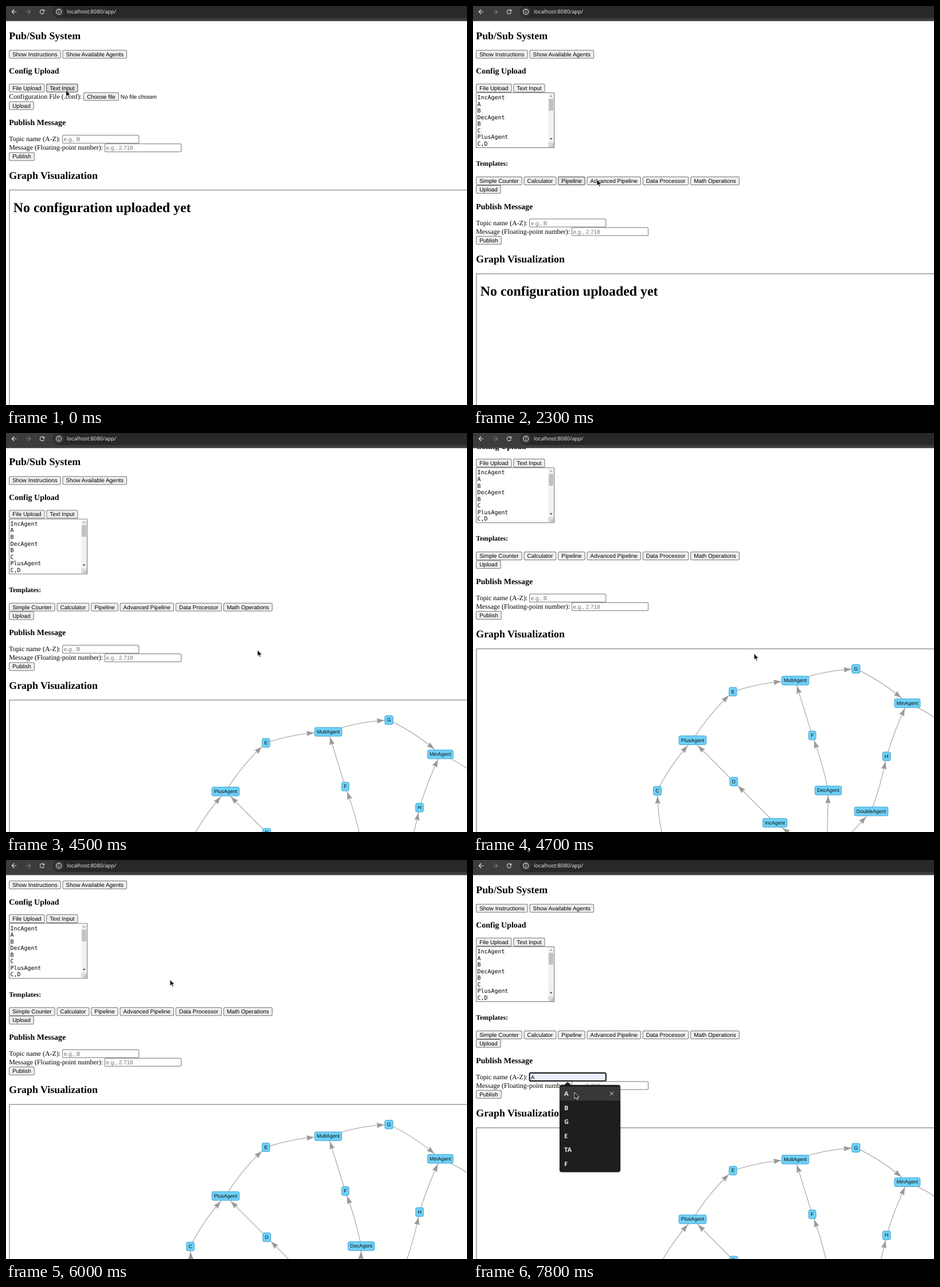
An HTML page with a canvas that plays this animation: 804x697 px, repeating every 8000 ms.

```html
<!DOCTYPE html>
<html lang="en">
<head>
<meta charset="utf-8">
<title>Pub/Sub System</title>
<style>
  html, body { margin: 0; height: 100%; overflow: hidden; background: #fffffd; }
  canvas { display: block; }
</style>
</head>
<body>
<canvas id="stage" width="804" height="697"></canvas>
<script>
const ctx = document.getElementById('stage').getContext('2d');
ctx.textRendering = 'geometricPrecision';

const LOOP = 8000, LEFT = 5.2, TOP = 26.4, PAPER = '#fffffd';
const ZOOM = .7467, GAP = 4 * ZOOM, ROW = 20.02 * ZOOM;
const serif = (px, weight = 400) => `${weight} ${px}px "Liberation Serif", "Times New Roman", serif`;
const sans = px => `${px}px "Liberation Sans", Arial, sans-serif`;
const BODY = serif(16 * ZOOM), CONTROL = sans(13.333 * ZOOM), NODE = sans(8.9);
const MONO = `${13.333 * ZOOM}px "DejaVu Sans Mono", monospace`;
const UI = '9.25px "Noto Sans", sans-serif', MENU = '600 11px "Noto Sans", sans-serif';

// Moves: [start ms, end ms, ...values reached]
const POINTER = [
  [0, 0, 104.5, 147], [100, 500, 97.5, 141], [800, 1700, 213, 303], [1700, 1800, 229, 304],
  [2200, 2300, 216, 303], [2400, 2600, 140, 304], [2700, 3600, 34, 338], [3600, 3800, 29, 317],
  [4100, 4500, 438.5, 379], [4500, 5200, 619, 401], [5300, 5800, 290, 180],
  [5800, 6200, 282, 238], [6200, 6300, 184.5, 355], [6400, 6500, 177.5, 362],
  [6500, 6700, 169, 370], [7500, 7800, 177, 406]
];
const SCROLL = [[0, 0, 0], [4400, 4500, 1.3], [4500, 5000, 225], [5300, 5800, 81.4], [5800, 6200, 0]];

const AGENTS = {
  plus: ['PlusAgent', 383, 627.6], mult: ['MultAgent', 562, 523.3], min: ['MinAgent', 757.5, 562.7],
  dec: ['DecAgent', 619.5, 715.2], double: ['DoubleAgent', 694.5, 751.8],
  inc: ['IncAgent', 526.5, 771.8], dec2: ['DecAgent', 338, 822], inc2: ['IncAgent', 500, 880],
  sub: ['DecAgent', 830, 690], A: ['A', 617, 835]
};
// A topic lies halfway between two agents, moved sideways by bow; its two edges bend a little
const LINKS = [
  ['dec2', 'C', 'plus', 40, 8, 8], ['plus', 'E', 'mult', 38, 8, 8], ['mult', 'G', 'min', 41, 8, 8],
  ['min', 'I', 'sub', 40, 8, 8], ['inc2', 'B', 'dec2', -20, 0, 0], ['inc', 'D', 'plus', 0, 0, 0],
  ['dec', 'F', 'mult', -1, -4, 0], ['double', 'H', 'min', 5, -4, 4]
];
const nodes = { ...AGENTS };
const edges = ['dec', 'double', 'inc', 'inc2'].map(to => ['A', to, 0]);
for (const [from, topic, to, bow, bendIn, bendOut] of LINKS) {
  nodes[topic] = [topic, ...bowed(AGENTS[from], AGENTS[to], bow)];
  edges.push([from, topic, bendIn], [topic, to, bendOut]);
}

let time, mouse, y;

function bowed([, ax, ay], [, bx, by], bow) {
  const dx = bx - ax, dy = by - ay, k = bow / Math.hypot(dx, dy);
  return [(ax + bx) / 2 + dy * k, (ay + by) / 2 - dx * k];
}

function at(moves, t) {
  let value;
  for (const [start, end, ...goal] of moves) {
    if (t < start) break;
    const p = Math.min(1, (t - start) / (end - start || 1));
    value = value ? value.map((v, i) => v + (goal[i] - v) * p) : goal;
  }
  return value;
}

function text(s, x, base, font, color = '#000') {
  ctx.font = font;
  ctx.fillStyle = color;
  ctx.fillText(s, x, base);
  return x + ctx.measureText(s).width;
}

function width(s, font) {
  ctx.font = font;
  return ctx.measureText(s).width;
}

function rect(x, y, w, h, color) {
  ctx.fillStyle = color;
  ctx.fillRect(x, y, w, h);
}

function box(x, y, w, h, r, fill, stroke, line = 1) {
  ctx.beginPath();
  ctx.roundRect(x, y, w, h, r);
  ctx.fillStyle = fill;
  ctx.fill();
  if (stroke) outline(stroke, line);
}

function outline(color, line) {
  ctx.strokeStyle = color;
  ctx.lineWidth = line;
  ctx.stroke();
}

function poly(points, fill) {
  ctx.beginPath();
  points.forEach(p => ctx.lineTo(...p));
  ctx.closePath();
  ctx.fillStyle = fill;
  ctx.fill();
}

function strokes(color, line, ...paths) {
  ctx.beginPath();
  for (const path of paths) path.forEach((p, i) => i ? ctx.lineTo(...p) : ctx.moveTo(...p));
  outline(color, line);
}

// Page parts flow downwards from y
function heading(s, size, margin) {
  const px = size * ZOOM;
  text(s, LEFT, y + margin * px + .912 * px, serif(px, 700));
  y += (2 * margin + 1.149) * px;
}
const h2 = s => heading(s, 24, .83), h3 = s => heading(s, 18.72, 1), h4 = s => heading(s, 16, 1.33);

function button(label, x) {
  const w = width(label, CONTROL) + 16 * ZOOM;
  const hot = mouse[0] > x && mouse[0] < x + w && mouse[1] > y && mouse[1] < y + ROW;
  const down = hot && time >= 2000 && time < 2200;
  box(x + .4, y + .5, w - .8, ROW - 1, 2,
      down ? '#f5f5f5' : hot ? '#e3e3e3' : '#efefef',
      down ? '#9a9a9a' : hot ? '#484848' : '#747474');
  text(label, x + 8 * ZOOM, y + 10.9, CONTROL);
  return x + w + GAP;
}

function buttons(...labels) {
  labels.reduce((x, label) => button(label, x), LEFT);
  y += ROW;
}

function field(label, hint, focused, value) {
  const x = text(label, LEFT, y + 10.8, BODY) + GAP;
  box(x + .4, y + .2, 133.2, ROW - 1, 2, value ? '#e8f0fe' : '#fff',
      focused ? '#101014' : '#767676', focused ? 2 : 1);
  text(value || hint, x + 2.6, y + 10.7, CONTROL, value ? '#000' : '#757575');
  y += ROW;
}

function textarea(filled) {
  const top = y + .5, bottom = top + 96.7;
  const lines = filled ? ['IncAgent', 'A', 'B', 'DecAgent', 'B', 'C', 'PlusAgent', 'C,D']
                       : ['Enter your', 'configuration here...'];
  box(LEFT + .4, top + .4, 136, 96, .5, '#fff', '#767676');
  lines.forEach((s, i) => text(s, 7.5, top + 12.1 + i * 11.53, MONO, filled ? '#000' : '#757575'));
  if (filled) {
    rect(131, top + 1, 10, 86, '#f1f1f1');
    rect(132.2, top + 11, 7.8, 20.5, '#c1c1c1');
    poly([[133.8, top + 7.3], [136.3, top + 4.3], [138.8, top + 7.3]], '#a3a3a3');
    poly([[133.8, top + 79.6], [138.8, top + 79.6], [136.3, top + 82.6]], '#505050');
    rect(131, bottom - 10, 10, 9.2, '#dcdcdc');
  }
  strokes('#8a8a8a', .8, [[135, bottom - 1], [141, bottom - 7]], [[138, bottom - 1], [141, bottom - 4]]);
  y += 101.8;
}

const nodeWidth = label => width(label, NODE) + 7.4;

function edge([from, to, bend]) {
  const a = nodes[from].slice(1), [label, ...b] = nodes[to];
  const c = bowed(nodes[from], nodes[to], bend);
  const point = t => a.map((v, i) => (1 - t) ** 2 * v + 2 * t * (1 - t) * c[i] + t * t * b[i]);
  ctx.beginPath();
  ctx.moveTo(...a);
  ctx.quadraticCurveTo(...c, ...b);
  outline('#999', 1);

  // The arrow tip sits where the curve meets the border of its node
  const half = nodeWidth(label) / 2;
  let t = 1, p = b;
  while (Math.abs(p[0] - b[0]) < half + .5 && Math.abs(p[1] - b[1]) < 9) p = point(t -= .004);
  const q = point(t - 12 / Math.hypot(b[0] - a[0], b[1] - a[1]));
  ctx.save();
  ctx.translate(...p);
  ctx.rotate(Math.atan2(p[1] - q[1], p[0] - q[0]));
  poly([[0, 0], [-13.5, 4.6], [-12, 0], [-13.5, -4.6]], '#999');
  ctx.restore();
}

function graph() {
  edges.forEach(edge);
  for (const [label, x, cy] of Object.values(nodes)) {
    const w = nodeWidth(label);
    box(x - w / 2, cy - 7.7, w, 15.4, 3.5, '#6fd0f6', '#43a6d6');
    text(label, x - w / 2 + 3.7, cy + 2.7, NODE, '#111');
  }
}

function page() {
  y = TOP;
  h2('Pub/Sub System');
  buttons('Show Instructions', 'Show Available Agents');
  h3('Config Upload');
  buttons('File Upload', 'Text Input');
  if (time < 300) {
    const x = text('Configuration File (.conf):', LEFT, y + 10.9, BODY) + GAP;
    text('No file chosen', button('Choose file', x), y + 10.9, CONTROL);
    y += ROW + 1;
  } else {
    textarea(time >= 2200);
    h4('Templates:');
    buttons('Simple Counter', 'Calculator', 'Pipeline', 'Advanced Pipeline',
            'Data Processor', 'Math Operations');
  }
  buttons('Upload');
  h3('Publish Message');
  field('Topic name (A-Z):', 'e.g., B', time >= 7000, time >= 7700 && 'A');
  field('Message (Floating-point number):', 'e.g., 2.718');
  buttons('Publish');
  h2('Graph Visualization');
  rect(LEFT, y, 900, 448, '#979797');
  rect(LEFT + 1.5, y + 1.5, 900, 445, PAPER);
  if (time < 3900) text('No configuration uploaded yet', 12.8, y + 39.2, serif(32 * ZOOM, 700));
  if (time >= 4200) graph();
}

function menu(picked) {
  ctx.save();
  ctx.shadowColor = 'rgba(0,0,0,.35)';
  ctx.shadowBlur = 3;
  box(151, 393, 106, 152.3, 4, '#1e1e1e');
  ctx.restore();
  poly([[158.5, 393.5], [165, 387.5], [171.5, 393.5]], '#1e1e1e');
  if (picked) {
    rect(151, 396, 106, 24.3, '#383838');
    strokes('#d8d8d8', 1, [[238.8, 405], [245, 411.2]], [[245, 405], [238.8, 411.2]]);
  }
  ['A', 'B', 'G', 'E', 'TA', 'F'].forEach((s, i) => text(s, 159, 412 + i * 24.5, MENU, '#e3e3e3'));
}

function toolbar() {
  const ink = '#dedede';
  rect(0, 0, 804, TOP, '#3c3c3c');
  box(82, -1, 760, 22, 11, '#282828');
  box(83.7, 1.5, 17, 17, 8.5, '#3a3a3a');
  const arrow = (x, dir, color) => strokes(color, 1.2,
    [[x - 4 * dir, 10], [x + 4 * dir, 10]],
    [[x, 6], [x + 4 * dir, 10], [x, 14]]);
  arrow(14.3, -1, ink);
  arrow(38.7, 1, '#777');
  const arc = (x, r, from, to) => {
    ctx.beginPath();
    ctx.arc(x, 10, r, from, to);
    outline(ink, 1.1);
  };
  arc(63, 3.6, .35, 5.5);
  poly([[67.2, 5.8], [67.2, 9.4], [63.6, 9.4]], ink);
  arc(92.2, 4.4, 0, 7);
  rect(91.7, 9.4, 1, 3, ink);
  rect(91.7, 7.3, 1, 1.1, ink);
  text('localhost:8080/app/', 106, 13, UI, '#e3e3e3');
}

function pointer(x, y) {
  ctx.save();
  ctx.translate(x, y);
  ctx.lineJoin = 'round';
  poly([[0, 0], [0, 11], [2.6, 8.7], [4.4, 12.6], [6.2, 11.8], [4.5, 8.1], [8, 8]], '#111');
  outline('#fff', .8);
  ctx.restore();
}

function draw(ms) {
  time = Math.floor(ms % LOOP / 100) * 100;
  const [scroll] = at(SCROLL, time);
  // Controls react a little before the drawn pointer reaches them
  const [mx, my] = at(POINTER, time + 250);
  mouse = [mx, my + scroll];
  rect(0, 0, 804, 697, PAPER);
  ctx.save();
  // The tiny skew lets text baselines rest between whole pixels
  ctx.transform(1, 1e-5, 0, 1, 0, -scroll);
  page();
  ctx.restore();
  if (time >= 7000) menu(time >= 7700);
  toolbar();
  pointer(...at(POINTER, time));
}

let start;
function tick(now) {
  start ??= now;
  draw(now - start);
  requestAnimationFrame(tick);
}
requestAnimationFrame(tick);
</script>
</body>
</html>
```
